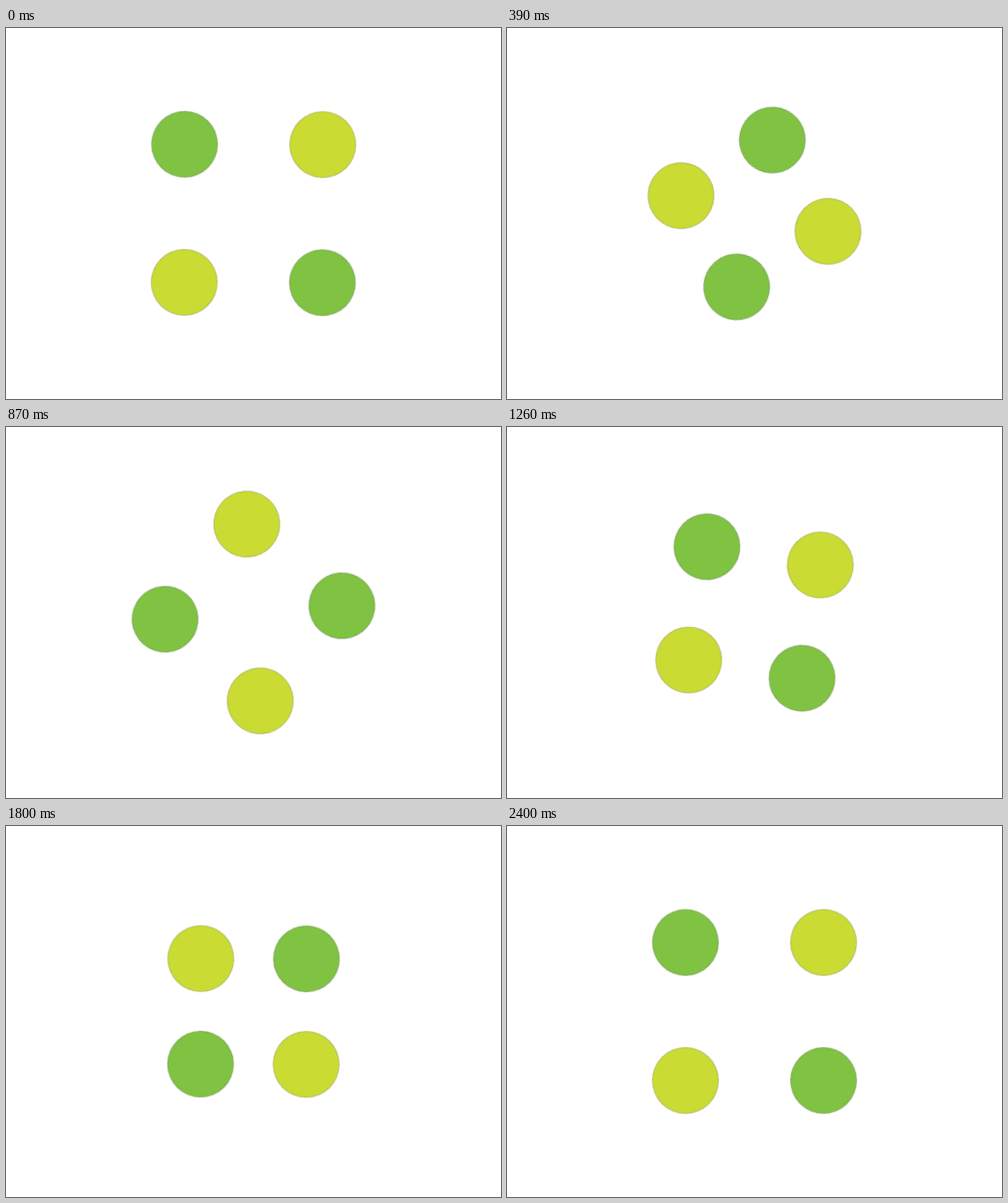
An HTML page without scripts for the animation above (2.43 s loop, 512x384 px).

```html
<!DOCTYPE html>
<html lang="en">
<head>
<meta charset="utf-8">
<title>Orbiting dots</title>
<style>
  html, body {
    margin: 0;
    width: 100%;
    height: 100%;
    overflow: hidden;
    background: #fff;
  }
  svg { display: block; width: 100vw; height: 100vh; }

  .orbit { animation: spin 2430ms linear infinite; }

  circle {
    r: 34.2px;
    stroke: rgb(0 0 0 / .4);
    stroke-width: .5px;
    animation: pulse 810ms infinite;
  }
  .green { fill: #80c242; }
  .lime { fill: #cadb34; }

  /* one full turn in 2400 ms, then a 30 ms rest */
  @keyframes spin {
    0% { transform: rotate(0deg); }
    98.7654%, 100% { transform: rotate(360deg); }
  }
  @keyframes pulse {
    0% { transform: translateY(-101.1px); animation-timing-function: ease; }
    32.5% { transform: translateY(-75.6px); }
    41.8% { transform: translateY(-75.6px); animation-timing-function: cubic-bezier(.25, .1, .35, 1); }
    100% { transform: translateY(-101.1px); }
  }
</style>
</head>
<body>
<svg viewBox="0 0 512 384">
  <g transform="translate(256 192)">
    <g class="orbit">
      <g transform="rotate(-45)"><circle class="green"/></g>
      <g transform="rotate(45)"><circle class="lime"/></g>
      <g transform="rotate(135)"><circle class="green"/></g>
      <g transform="rotate(225)"><circle class="lime"/></g>
    </g>
  </g>
</svg>
</body>
</html>
```
